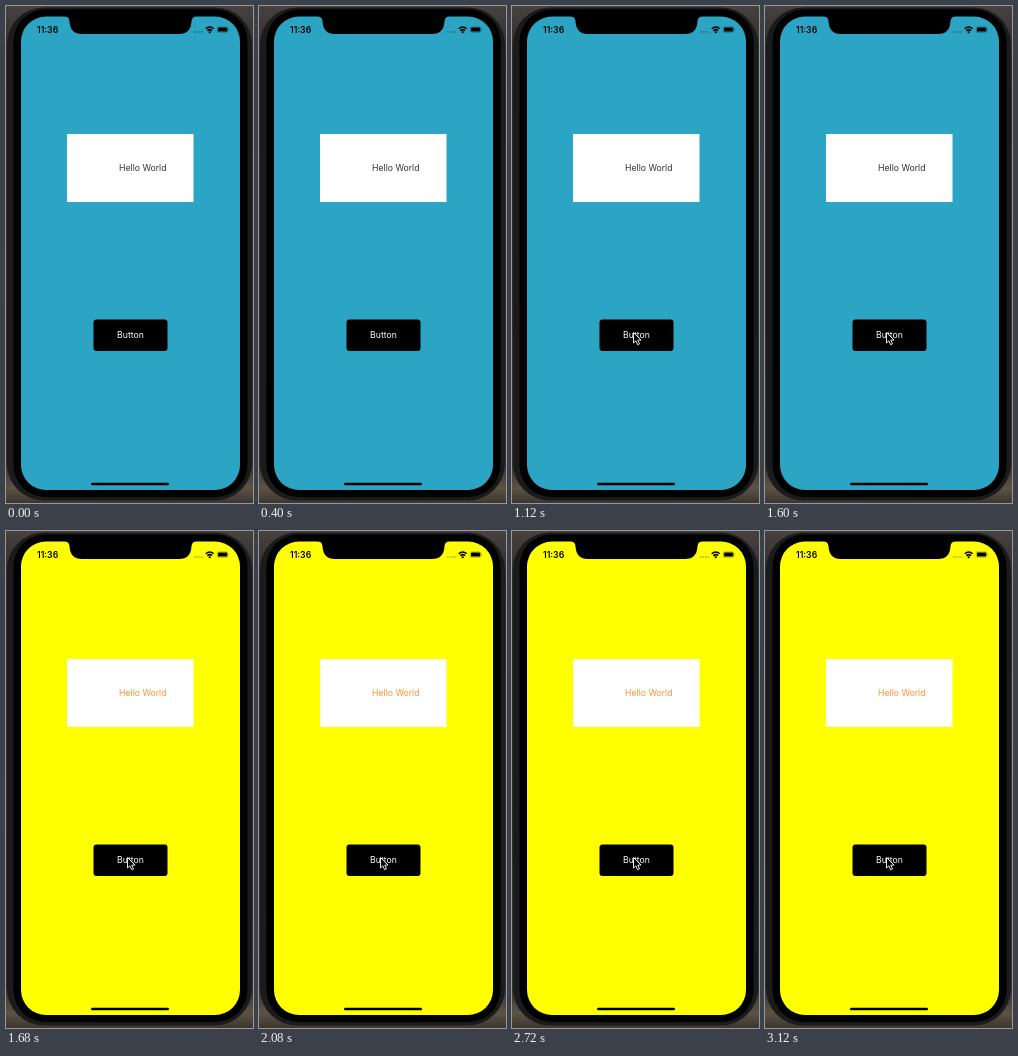
These frames come from a looping animation (247x497 px, 3.2 s). An HTML page:

```html
<!DOCTYPE html>
<html lang="en">
<head>
<meta charset="utf-8">
<title>Button demo</title>
<style>
  html, body { margin: 0; width: 100%; height: 100%; overflow: hidden; background: #302e2d; }
  svg { display: block; width: 100vw; height: 100vh; }
  text { font-family: Inter, Roboto, sans-serif; }
</style>
</head>
<body>
<svg viewBox="0 0 247 497">
  <defs>
    <linearGradient id="desk" x2="0" y2="1">
      <stop offset="0" stop-color="#46423f"/>
      <stop offset=".1" stop-color="#2c2a2a"/>
      <stop offset=".92" stop-color="#343130"/>
      <stop offset=".97" stop-color="#5c5344"/>
      <stop offset="1" stop-color="#3c362f"/>
    </linearGradient>
  </defs>
  <rect width="247" height="497" fill="url(#desk)"/>

  <!-- Phone body and screen -->
  <rect x="1" y="1.5" width="245" height="493" rx="37" fill="#1b1b1c"/>
  <rect x="7.5" y="3.5" width="234" height="487.5" rx="32"/>
  <rect id="screen" x="15" y="10.5" width="219" height="473.5" rx="25"/>
  <path d="M58 10H191Q186 10.500 185.500 15Q185 28 173 28H76Q64 28 63.500 15Q63 10.500 58 10Z"/>

  <!-- Status bar -->
  <text x="31" y="27" font-size="8.700" font-weight="600">11:36</text>
  <path d="M188 26H197" stroke="#000" stroke-opacity=".45" stroke-dasharray="1.500 1"/>
  <g fill="none" stroke="#000" stroke-width="1.500">
    <path d="M199.700 22.800Q203.700 19.200 207.700 22.800M201.300 24.700Q203.700 22.500 206.100 24.700"/>
  </g>
  <path d="M202.200 25.900Q203.700 24.800 205.200 25.900L203.700 27.400Z"/>
  <rect x="211.300" y="20.900" width="10.600" height="5.400" rx="1.500" fill="none" stroke="#000" stroke-opacity=".45" stroke-width=".6"/>
  <rect x="212" y="21.600" width="9.200" height="4" rx=".9"/>
  <path d="M222.700 22.600Q223.800 23.600 222.700 24.600Z" fill-opacity=".5"/>

  <!-- App content -->
  <rect x="61" y="128" width="126.500" height="68" fill="#fff"/>
  <text id="label" x="113" y="165" font-size="8.700" textLength="">Hello World</text>
  <rect x="87.500" y="313.500" width="74" height="31.500" rx="3"/>
  <text x="124.500" y="332" font-size="8.700" text-anchor="middle" fill="#fff">Button</text>
  <rect x="85" y="476.700" width="78" height="2.500" rx="1.250"/>

  <path id="cursor" d="M0 0V10.500L2.400 8.300L4.100 12.200L6 11.400L4.300 7.600H7.600Z" stroke="#fff" stroke-width=".9" stroke-linejoin="round"/>
</svg>
<script>
  const LOOP = 3200, ENTER = 560, ARRIVE = 1040, TAP = 1680;
  const [screen, label, cursor] = ['screen', 'label', 'cursor'].map(id => document.getElementById(id));
  label.removeAttribute('textLength');

  // Cursor stops: time, x, y
  const path = [[ENTER, 2, 366], [720, 53, 338], [ARRIVE, 121.5, 326.5]];

  function cursorAt(t) {
    const i = t < path[1][0] ? 0 : 1;
    const [t0, x0, y0] = path[i], [t1, x1, y1] = path[i + 1];
    const k = Math.min(1, (t - t0) / (t1 - t0));
    const e = i ? k * (2 - k) : k;
    return [x0 + (x1 - x0) * e, y0 + (y1 - y0) * e];
  }

  function draw(now) {
    const t = now % LOOP, tapped = t >= TAP;
    screen.setAttribute('fill', tapped ? '#ffff00' : '#2ba5c3');
    label.setAttribute('fill', tapped ? '#ff9230' : '#333');
    cursor.setAttribute('visibility', t < ENTER ? 'hidden' : 'visible');
    if (t >= ENTER) cursor.setAttribute('transform', `translate(${cursorAt(t)})`);
    requestAnimationFrame(draw);
  }
  draw(performance.now());
</script>
</body>
</html>
```
